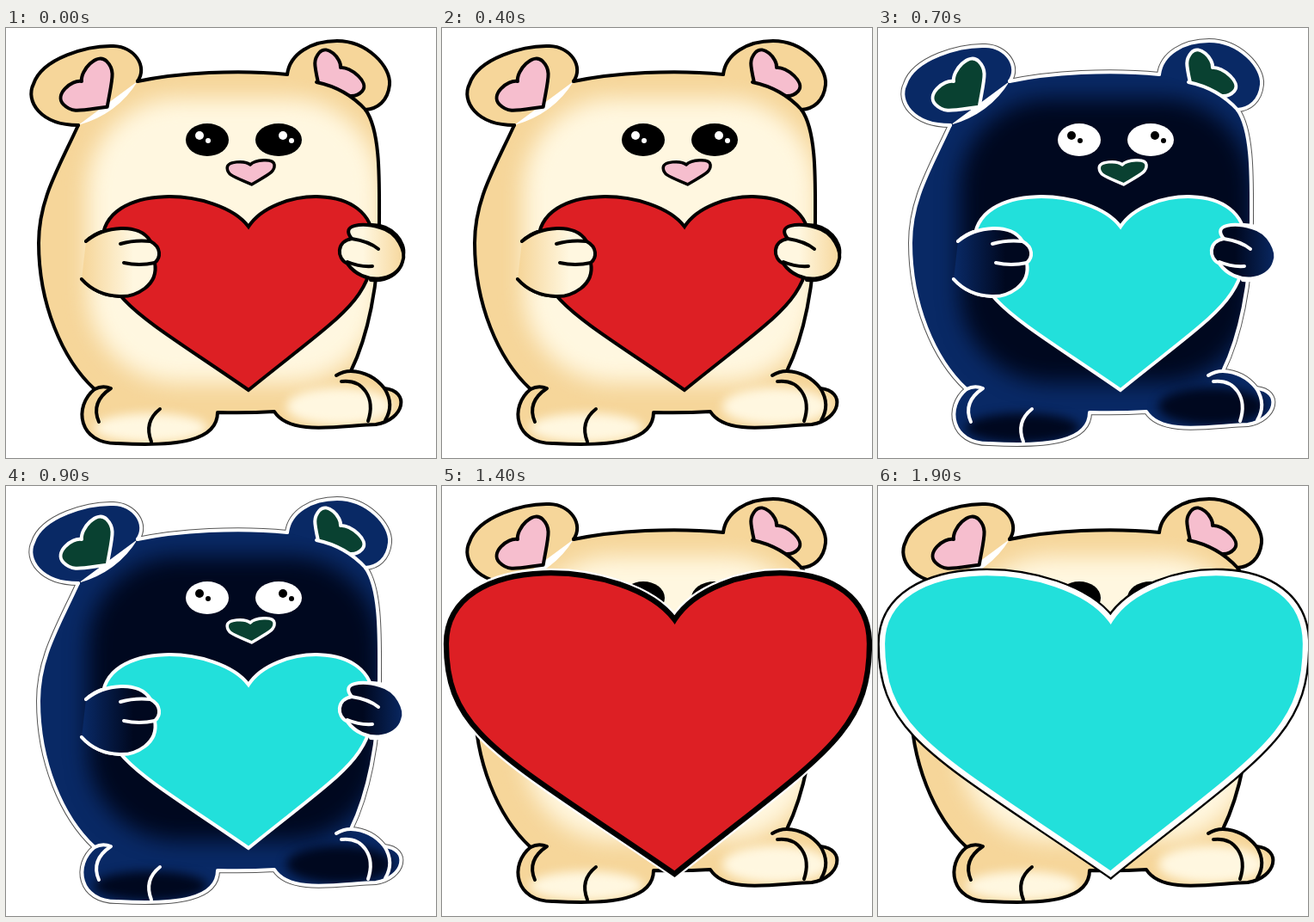
An HTML page with a canvas for the animation above (2 s loop, 500 by 500 pixels).

```html
<!DOCTYPE html>
<html lang="en">
<head>
<meta charset="utf-8">
<title>Bear with a heart</title>
<style>
html, body { margin: 0; width: 100%; height: 100%; overflow: hidden; background: #fff; }
canvas { display: block; width: 500px; height: 500px; }
</style>
</head>
<body>
<canvas id="stage" width="500" height="500"></canvas>
<script>
const ctx = document.getElementById('stage').getContext('2d');
const STEP = 100, STEPS = 20, HANDS_OFF = 12, HEART_BIG = 13;

// A heart hung from its notch, with its own reach to each side.
function heart(x, y, left, right, depth, degrees = 0) {
  const path = new Path2D();
  const lobe = w => {
    path.moveTo(0, 0);
    path.bezierCurveTo(w * 0.2, depth * -0.24, w, depth * -0.28, w, depth * 0.095);
    path.bezierCurveTo(w, depth * 0.45, w * 0.76, depth * 0.53, 0, depth);
  };
  // The right lobe runs back from the tip so that the outline is one loop.
  lobe(-left);
  path.bezierCurveTo(right * 0.76, depth * 0.53, right, depth * 0.45, right, depth * 0.095);
  path.bezierCurveTo(right, depth * -0.28, right * 0.2, depth * -0.24, 0, 0);
  path.closePath();
  const placed = new Path2D();
  placed.addPath(path, new DOMMatrix().translate(x, y).rotate(degrees));
  return placed;
}

const torso = 'M84 113C60 165 38 200 38 250C38 320 65 385 103 420' +
  'C78 440 84 484 130 483C200 487 246 480 246 447Q280 448 312 446' +
  'C330 475 390 462 430 461C464 455 470 422 440 419Q425 400 401 399' +
  'C420 360 434 300 434 225C434 180 436 120 418 95Q395 70 361 63';
const crown = '327 54C270 48 200 52 153 62';
const body = new Path2D(`${torso}L${crown}Q130 100 84 113Z`);
const bodyLine = new Path2D(`${torso}M${crown}`);
const ears = [
  new Path2D('M84 113C40 113 22 85 32 65C42 35 95 20 125 21C150 22 165 45 153 62'),
  new Path2D('M327 54C330 30 355 15 385 15C420 15 448 45 446 66C444 85 432 94 418 95')
];
const toes = new Path2D('M103 420Q112 415 122 419Q98 435 108 458M179 443Q160 458 169 481' +
  'M384 404Q392 399 401 399M390 411C415 408 430 430 421 457M440 419Q452 438 441 456');

const leftArm = new Path2D('M93 248Q102 240 111 237M88 292Q105 311 133 312');
const rightArm = new Path2D('M424 229C450 228 465 250 462 264C460 288 440 295 424 293');
const elbow = new Path2D('M424 253L434 257');
const leftHand = new Path2D('M93 248C115 230 155 226 168 248C181 255 180 267 173 273' +
  'C178 300 150 313 132 312Q105 311 88 292');
const rightHand = new Path2D('M402 245C388 228 415 226 435 232C455 237 466 260 461 272' +
  'C455 295 415 300 397 274C384 268 384 248 402 245');
const knuckles = new Path2D('M133 251Q150 246 168 248M137 273Q155 277 173 273' +
  'M402 245Q422 248 433 257M397 272Q411 278 426 277');

const earHearts = [heart(88, 62, 34, 37, 42, -45), heart(389, 46, 30, 37, 36, 42)];
const nose = heart(284, 159, 27, 28, 23, -4);
const bigHeart = heart(282, 231, 170, 145, 190);

const COLORS = {
  ink: [0, 0, 0], light: [255, 255, 255], cream: [255, 247, 224],
  tan: [246, 214, 154], pink: [246, 190, 206], red: [221, 31, 36]
};

function palette(inverted) {
  const out = {};
  for (const [name, rgb] of Object.entries(COLORS))
    out[name] = `rgb(${rgb.map(v => inverted ? 255 - v : v)})`;
  return out;
}
const themes = [palette(false), palette(true)];

function line(path, color, width = 4) {
  ctx.strokeStyle = color;
  ctx.lineWidth = width;
  ctx.stroke(path);
}

function fill(path, color) {
  ctx.fillStyle = color;
  ctx.fill(path);
}

function oval(x, y, rx, ry, color) {
  ctx.beginPath();
  ctx.ellipse(x, y, rx, ry, 0, 0, Math.PI * 2);
  ctx.fillStyle = color;
  ctx.fill();
}

// Tan fur with soft cream light on the belly and the feet.
function drawFur(c) {
  fill(body, c.tan);
  ctx.save();
  ctx.clip(body);
  ctx.filter = 'blur(13px)';
  ctx.beginPath();
  ctx.roundRect(95, 82, 340, 330, 105);
  ctx.fillStyle = c.cream;
  ctx.fill();
  ctx.filter = 'blur(6px)';
  oval(168, 465, 66, 17, c.cream);
  oval(388, 440, 62, 22, c.cream);
  ctx.restore();
}

function shade(path, c, from, to) {
  const g = ctx.createLinearGradient(from, 0, to, 0);
  g.addColorStop(0, c.tan);
  g.addColorStop(1, c.cream);
  fill(path, g);
}

function drawEye(x, rx, glint, c) {
  oval(x, 130, rx, 19, c.ink);
  oval(x + glint, 125, 5, 5, c.light);
  oval(x + glint + 10, 131, 3, 3, c.light);
}

function drawBear(c, inverted) {
  if (inverted) [bodyLine, ...ears].forEach(p => line(p, '#555', 6));
  ears.forEach((ear, i) => {
    fill(ear, c.tan);
    fill(earHearts[i], c.pink);
    line(earHearts[i], c.ink);
  });
  drawFur(c);
  [...ears, bodyLine, toes].forEach(p => line(p, c.ink));
  drawEye(234, 25, -9, c);
  drawEye(317, 27, 5, c);
  fill(nose, c.pink);
  line(nose, c.ink, 3.5);
  shade(rightArm, c, 462, 415);
  [leftArm, rightArm, elbow].forEach(p => line(p, c.ink));
}

function drawHands(c) {
  shade(leftHand, c, 90, 148);
  shade(rightHand, c, 464, 415);
  [leftHand, rightHand, knuckles].forEach(p => line(p, c.ink));
}

function drawHeart(c, halo) {
  ctx.lineJoin = 'miter';
  if (halo) line(bigHeart, c.light, halo);
  fill(bigHeart, c.red);
  line(bigHeart, c.ink);
  ctx.lineJoin = 'round';
}

function draw(step) {
  const odd = step % 2;
  const big = step >= HEART_BIG;
  const bear = themes[big ? 0 : odd];
  ctx.fillStyle = '#fff';
  ctx.fillRect(0, 0, 500, 500);
  ctx.lineCap = ctx.lineJoin = 'round';
  drawBear(bear, odd && !big);
  if (big) {
    ctx.save();
    ctx.translate(-170, -204);
    ctx.scale(1.562, 1.556);
    drawHeart(themes[odd], 7);
    ctx.restore();
  } else {
    drawHeart(bear, step >= HANDS_OFF ? 8 : 0);
    if (step < HANDS_OFF) drawHands(bear);
  }
}

let shown = -1;
function tick() {
  const step = Math.floor(performance.now() / STEP) % STEPS;
  if (step !== shown) draw(shown = step);
  requestAnimationFrame(tick);
}
tick();
</script>
</body>
</html>
```
